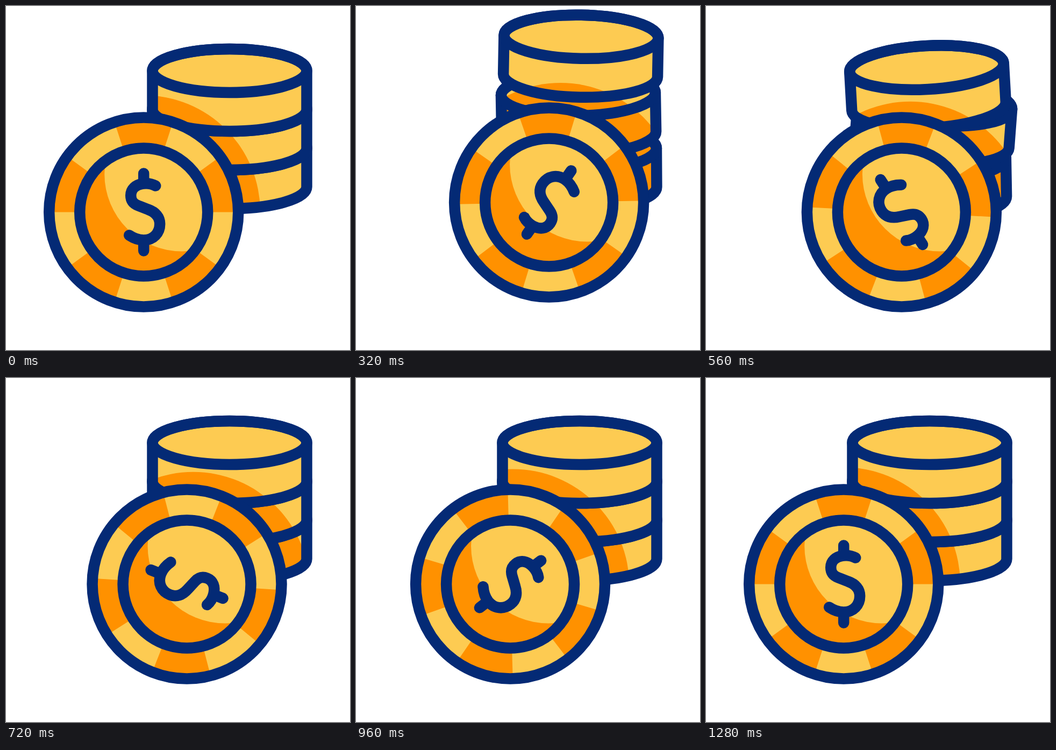
Recreate the animation shown at these times as an HTML page. Size 640x640 px, loop 1480 ms.

```html
<!DOCTYPE html>
<html lang="en">
<head>
<meta charset="utf-8">
<title>Coin stack</title>
<style>
html, body { margin: 0; width: 100%; height: 100%; overflow: hidden; background: #fff; }
svg { display: block; width: 100vw; height: 100vh; }
.gold { fill: #fdcb52; }
.amber { fill: #ff9100; }
.line { fill: none; stroke: #042a75; stroke-width: 20.5; stroke-linecap: round; stroke-linejoin: round; }
</style>
</head>
<body>
<svg viewBox="0 0 640 640">
  <defs>
    <path id="body" d="M-143.5-36V36a143.5 40.5 0 0 0 287 0V-36a143.5 40.5 0 0 0-287 0z"/>
    <ellipse id="lid" cy="-36" rx="143.5" ry="40.5"/>
    <clipPath id="face"><circle r="119"/></clipPath>
  </defs>
  <g id="stack"></g>
  <g id="coin">
    <circle class="gold" r="176"/>
    <g id="rim">
      <circle r="147.5" fill="none" stroke="#ff9100" stroke-width="57"
        pathLength="10" stroke-dasharray="1 1" stroke-dashoffset="1"/>
    </g>
    <circle class="line" r="176"/>
    <circle class="amber" r="119"/>
    <circle class="gold" cx="71" cy="-71" r="144" clip-path="url(#face)"/>
    <circle class="line" r="119"/>
    <path id="sign" class="line" d="M0-72V-53M0 52V72M22-49C14-53.5 7-54-1-53C-15-51-24-43-24-31
      C-24-21-19-15.5-10-12L8-5C22 0 30 9 30 22C30 39 18 52 0 52C-10 52-18 49-27 43"/>
  </g>
</svg>
<script>
const LOOP = 1480, STEP = 40, LEAD = 80, LAST = 30;
const $ = id => document.getElementById(id);
const ease = u => { u = Math.min(1, Math.max(0, u)); return u * u * (3 - 2 * u); };

// Smooth curve through [step, value] keys, flat at peaks and ends.
function track(...keys) {
  const rate = i => (keys[i + 1][1] - keys[i][1]) / (keys[i + 1][0] - keys[i][0]);
  const slopes = keys.map((k, i) => {
    if (!i || i === keys.length - 1) return 0;
    const a = rate(i - 1), b = rate(i);
    return a * b > 0 ? 2 * a * b / (a + b) : 0;
  });
  return n => {
    const end = keys.length - 1;
    if (n >= keys[end][0]) return keys[end][1];
    let i = 0;
    while (n >= keys[i + 1][0]) i++;
    const [t0, v0] = keys[i], [t1, v1] = keys[i + 1];
    const d = t1 - t0, u = (n - t0) / d;
    return v0 + (v1 - v0) * ease(u)
      + d * u * (1 - u) * ((1 - u) * slopes[i] - u * slopes[i + 1]);
  };
}

const spin = track([0, 0], [3, -74], [8, -180], [12, -213], [16, -248.5], [22, -307.5], [29, -360]);

// Stacked pieces, bottom first.
const pieces = [
  { y: 300.5,
    dx: track([0, 0], [3, 1], [8, -1], [12, -1], [16, 0]),
    dy: track([0, 0], [3, -1], [8, 4], [12, 20], [16, 0]),
    tilt: track([0, 0], [3, 0.8], [8, -1], [12, -1], [16, 0]) },
  { y: 228.5,
    dx: track([0, 0], [3, 3.3], [8, -4.8], [12, 7.3], [16, 0]),
    dy: track([0, 0], [3, -14.5], [5.5, -30], [8, -17], [12, -11], [16, 0]),
    tilt: track([0, 0], [3, 2.7], [8, -3], [12, 4.3], [16, 0]) },
  { y: 156.5, top: true,
    dx: track([0, 0], [3, -5], [8, 6.2], [12, -3.5], [16, 0]),
    dy: track([0, 0], [3, -40.5], [5.5, -65], [8, -41], [12, -6], [16, 0]),
    tilt: track([0, 0], [3, -3.8], [8, 3.7], [12, -3.2], [16, 0]) }
];

$("stack").innerHTML = pieces.map((p, i) => `
  <clipPath id="clip${i}"><use href="#body" class="pose${i}"/></clipPath>
  <use href="#body" class="gold pose${i}"/>
  <circle class="amber shade" r="217" clip-path="url(#clip${i})"/>
  <g class="pose${i}">
    ${p.top ? '<use href="#lid" class="gold"/>' : ""}
    <use href="#body" class="line"/>
    <use href="#lid" class="line"/>
  </g>`).join("");
const poses = pieces.map((p, i) => document.querySelectorAll(".pose" + i));
const shades = document.querySelectorAll(".shade");

function draw(ms) {
  const n = Math.min(LAST, Math.max(0, Math.floor((ms - LEAD) / STEP + 0.001)));
  const dx = 119 * (n <= 8 ? ease(n / 7.8) : 1 - ease((n - 8) / 21));
  const hop = n < 8 ? -25.5 * Math.sin(Math.PI * n / 8) : 0;
  const turn = `rotate(${spin(n)})`;

  $("coin").setAttribute("transform", `translate(${256.2 + dx} ${383.5 + hop})`);
  $("rim").setAttribute("transform", turn);
  $("sign").setAttribute("transform", turn);

  pieces.forEach((p, i) => {
    const pose = `translate(${416 + p.dx(n)} ${p.y + p.dy(n)}) rotate(${p.tilt(n)})`;
    poses[i].forEach(el => el.setAttribute("transform", pose));
  });
  shades.forEach(el => {
    el.setAttribute("cx", 256 + 1.15 * dx - 0.35 * hop);
    el.setAttribute("cy", 383 + 0.11 * dx + 1.9 * hop);
  });
}

const start = performance.now();
function tick() {
  draw((performance.now() - start) % LOOP);
  requestAnimationFrame(tick);
}
tick();
</script>
</body>
</html>
```
